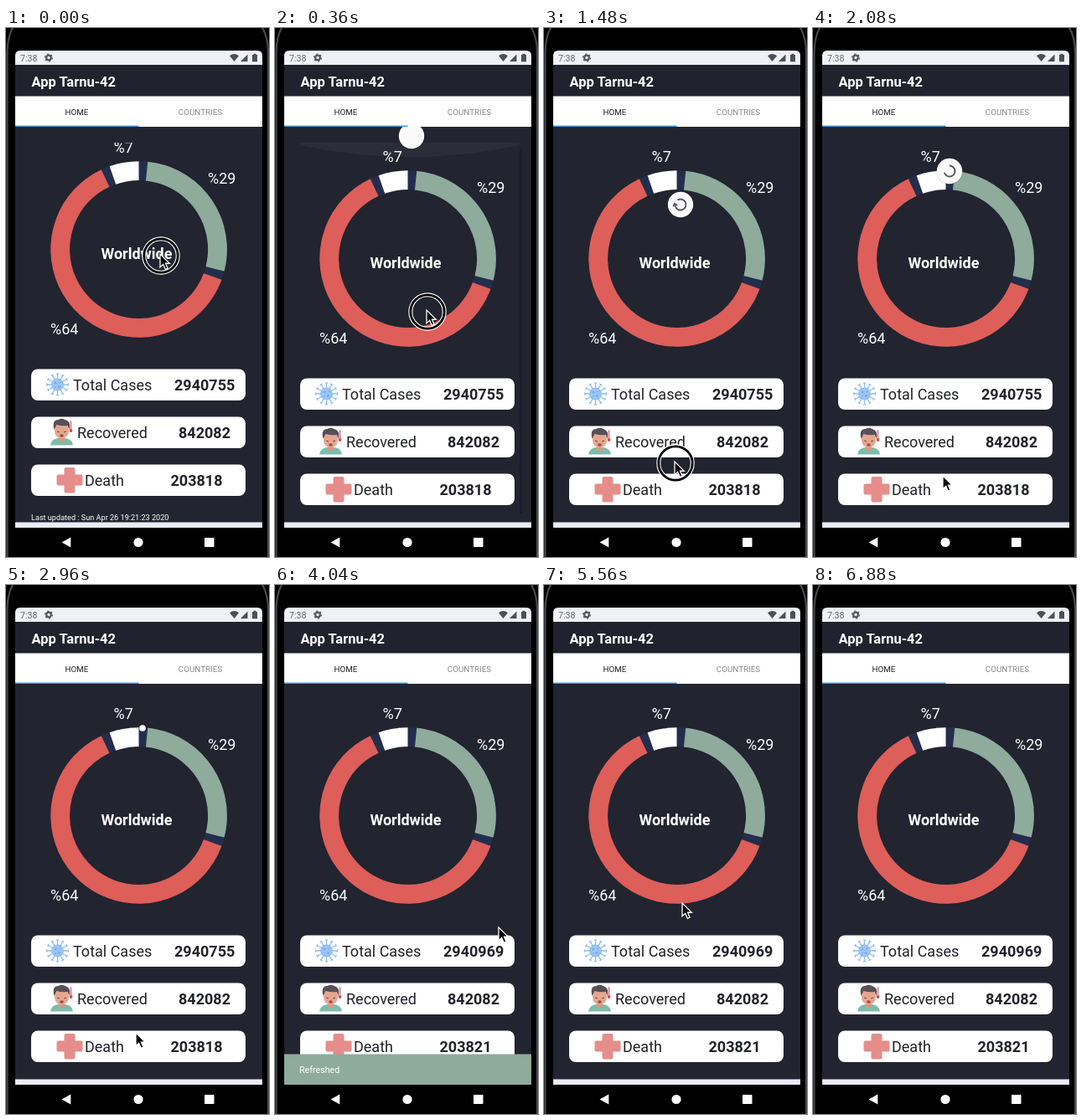
Recreate the animation shown at these times as an HTML page. Size 314 by 632 pixels, loop 6920 ms.

```html
<!DOCTYPE html>
<html lang="en">
<head>
<meta charset="utf-8">
<title>Case tracker</title>
<style>
html, body { margin: 0; width: 100%; height: 100%; overflow: hidden; background: #000; }
svg { display: block; width: 314px; height: 632px; font-family: Roboto, Arial, sans-serif; }
.big { font-size: 18px; }
.b { font-weight: 700; }
.ink { fill: #222329; }
.light { fill: #fff; }
</style>
</head>
<body>
<svg viewBox="0 0 314 632">
  <defs>
    <clipPath id="screen"><path d="M11 597V33q0-6 6-6H300q6 0 6 6V597Z"/></clipPath>
    <clipPath id="page"><rect x="11" y="118" width="295" height="472"/></clipPath>
    <clipPath id="list"><rect x="30" y="137" width="265" height="453"/></clipPath>
  </defs>

  <!-- phone body -->
  <rect width="314" height="632" fill="#000"/>
  <path d="M1.500 632V30Q1.500 10 9 -2M313 632V30Q313 10 305 -2" fill="none" stroke="#46484d" stroke-width="2.200"/>

  <g clip-path="url(#screen)">
    <rect x="11" y="27" width="295" height="570" fill="#22242f"/>
    <rect x="11" y="27" width="295" height="17" fill="#eff1f6"/>
    <text x="17" y="39.7" font-size="10.6" fill="#65686d">7:38</text>
    <g fill="none" stroke="#55585e">
      <circle cx="51" cy="35.5" r="2.8" stroke-width="2.2"/>
      <circle cx="51" cy="35.5" r="4.4" stroke-width="1.4" stroke-dasharray="2 2.6"/>
    </g>
    <g fill="#4c4f55">
      <path d="M267 33.2q5.500-4.400 11 0L272.500 40Z"/>
      <path d="M280 40h8.500v-8.500Z"/>
      <path d="M294 32h1.500v-1.200h3V32h1.500v8.300h-6Z"/>
    </g>
    <rect x="11" y="44" width="295" height="38" fill="#20222d"/>
    <text x="30.500" y="70" font-size="16.5" class="b light">App Tarnu-42</text>
    <rect x="11" y="81.500" width="295" height="36.500" fill="#fff"/>
    <text x="84.500" y="104" font-size="9.8" text-anchor="middle" fill="#222">HOME</text>
    <text x="232" y="104" font-size="9.8" text-anchor="middle" fill="#85868a">COUNTRIES</text>
    <rect x="11" y="116.500" width="147.500" height="1.500" fill="#3a9ae4"/>

    <g clip-path="url(#list)">
      <g id="content">
        <g id="donut" fill="none" stroke-width="22.800"></g>
        <text x="128.500" y="160" class="big light">%7</text>
        <text x="241" y="197" class="big light">%29</text>
        <text x="53" y="377" class="big light">%64</text>
        <text x="156" y="287" text-anchor="middle" class="big b light">Worldwide</text>
        <g id="cards"></g>
        <g id="virus" fill="#9cc6f8" stroke="#8fbdf3" stroke-width="1.300" transform="translate(61.5 437)">
          <circle r="6.800"/>
        </g>
        <g transform="translate(67 494)">
          <path d="M-14 15.500Q-13 8-5 7H4q8 1 9 8.500Z" fill="#7dbbae"/>
          <path d="M-4 4h7v6q-3.500 3-7 0Z" fill="#d9977f"/>
          <ellipse cx="-.5" cy="-2" rx="8.600" ry="9.500" fill="#e5a78d"/>
          <path d="M-9.500-3q-3-12 5-12q4-2.500 8 0q7 1 5.500 12l-2.500-5q-7 1-13-1Z" fill="#57505a"/>
          <path d="M-6-1l3 1M5-1l-3 1" stroke="#6a4a48" fill="none"/>
          <ellipse cx="-.5" cy="4" rx="2.300" ry="1.700" fill="#9c4a4c"/>
          <path d="M10.500-13v10" stroke="#e0707a" stroke-width="1.600" stroke-linecap="round"/>
          <circle cx="10.500" cy="-2" r="1.900" fill="#d94853"/>
        </g>
        <path d="M71.500 536h9q2 0 2 2v6.500h7q2 0 2 2v9q0 2-2 2h-7v7q0 2-2 2h-9q-2 0-2-2v-7h-7q-2 0-2-2v-9q0-2 2-2h7V538q0-2 2-2Z" fill="#e58d8a"/>
        <text x="30" y="599" font-size="9.15" class="light">Last updated : Sun Apr 26 19:21:23 2020</text>
      </g>
      <path id="glow" d="M30 137H292V140Q161 168 30 140Z" fill="#fff"/>
      <rect id="bar" x="292" y="143" width="3" height="437" fill="#1b1d27"/>
    </g>

    <g clip-path="url(#page)">
      <g id="puller">
        <circle cy=".8" r="15.600" fill="#000" opacity=".15"/>
        <circle r="15.200" fill="#fafafa"/>
        <g id="spin" fill="none" stroke="#55575b" stroke-width="1.900">
          <path id="arc"/>
          <path id="head" d="M3 0h7L6.500 4.500Z" fill="#55575b" stroke="none"/>
        </g>
      </g>
    </g>
    <rect x="11" y="590.500" width="295" height="6.500" fill="#ecebf8"/>
    <g id="snack">
      <rect x="11" y="560.500" width="295" height="36.500" fill="#8eab9c"/>
      <text x="29" y="583" font-size="10.7" class="light">Refreshed</text>
    </g>
  </g>

  <g class="light">
    <path d="M66.500 614.500L77.300 608.500V620.500Z"/>
    <circle cx="158" cy="614.500" r="5.600"/>
    <rect x="237" y="609" width="11.500" height="11" rx=".8"/>
  </g>

  <g id="cursor">
    <g id="ring" fill="none" transform="translate(1 2)">
      <circle r="20.200" stroke="#fff" stroke-width="5"/>
      <circle r="20.200" stroke="#000" stroke-width="2.800"/>
    </g>
    <path d="M0 0V14.500L3.400 11.400L5.800 17L8.400 15.900L6 10.400H10.500Z" transform="scale(1.080)" fill="#000" stroke="#fff" stroke-width="1.200"/>
  </g>
</svg>
<script>
const LOOP = 6920, STEP = 40;
const RELEASE = 1560, DONE = 2848, UPDATE = 3000;
const $ = id => document.getElementById(id);
const set = (el, attrs) => { for (const k in attrs) el.setAttribute(k, attrs[k]); return el; };
const add = (parent, tag, attrs, text = '') => {
  const el = set(document.createElementNS('http://www.w3.org/2000/svg', tag), attrs);
  el.textContent = text;
  return parent.appendChild(el);
};
const clamp = v => Math.max(0, Math.min(1, v));
const part = (t, from, to) => clamp((t - from) / (to - from));
const easeOut = p => 1 - (1 - p) ** 2;
const easeInOut = p => p * p * (3 - 2 * p);

// Each key is [time, value, ...]; values are interpolated linearly.
function track(keys, t) {
  let i = 0;
  while (i < keys.length - 2 && t >= keys[i + 1][0]) i++;
  const a = keys[i], b = keys[i + 1], p = part(t, a[0], b[0]);
  return a.slice(1).map((v, j) => v + (b[j + 1] - v) * p);
}

// Donut: every slice opens with a navy divider.
const ringSpec = { cx: 158.600, cy: 275.500, r: 93.900 };
add($('donut'), 'circle', { ...ringSpec, stroke: '#232d4c' });
const divider = 5.8;
let angle = 0;
for (const [percent, color] of [[29, '#8eab9c'], [64, '#de5e59'], [7, '#fff']]) {
  const slice = percent * 3.6, len = slice - divider;
  add($('donut'), 'circle', {
    ...ringSpec, stroke: color, pathLength: 360,
    'stroke-dasharray': `${len} ${360 - len}`,
    transform: `rotate(${angle + divider - 90} ${ringSpec.cx} ${ringSpec.cy})`
  });
  angle += slice;
}

// Cards
const cards = [
  ['Total Cases', 80, 201, '2940755', '2940969'],
  ['Recovered', 85, 206, '842082', '842082'],
  ['Death', 94, 196.500, '203818', '203821']
];
const counts = cards.map(([label, x, nx, before], i) => {
  const y = 418.500 + i * 57, g = $('cards');
  add(g, 'rect', { x: 30, y, width: 256, height: 37.500, rx: 8, fill: '#fff' });
  add(g, 'text', { x, y: y + 25.500, class: 'big ink' }, label);
  return add(g, 'text', { x: nx, y: y + 25.500, class: 'big b ink' }, before);
});

for (let a = 0; a < 360; a += 30) {
  const g = add($('virus'), 'g', { transform: `rotate(${a})` });
  add(g, 'path', { d: 'M0-6.500V-12.500M-1.700-12.800H1.700' });
}
for (const [cx, cy, r] of [[-2.500, -2, 1.5], [2.800, -2.500, 1.1], [1.800, 2.600, 1.6], [-2.600, 3.200, .9]])
  add($('virus'), 'circle', { cx, cy, r, fill: '#7dabe8', stroke: 'none' });

const pointer = [
  [0, 184, 270], [360, 181, 337], [1480, 156, 518], [1720, 155, 535], [3440, 155, 535],
  [4000, 267, 409], [4440, 267, 409], [5320, 165, 380], [5840, 165, 380], [6280, 150, 640], [LOOP, 150, 640]
];
const pull = [[140, 102], [360, 129], [1480, 211], [RELEASE, 213]];

function drawSpinner(t) {
  let head, sweep, tip = 1;
  if (t < RELEASE) {
    const p = part(t, 140, 1000);
    sweep = 288 * p;
    head = 165 - 300 * (1 - p) + (t - 1480) * .03;
  } else {
    const k = (t - RELEASE) / 1332, n = Math.floor(k), f = k - n;
    const grow = easeInOut(part(f, 0, .5)), shrink = easeInOut(part(f, .5, 1));
    const tail = -120 + k * 78 + 288 * (n + shrink);
    sweep = 12 + 276 * (grow - shrink);
    head = tail + sweep;
    tip = 1 - part(t, RELEASE, RELEASE + 200);
  }
  const a = -sweep * Math.PI / 180, r = 6.5;
  set($('arc'), { d: `M${r * Math.cos(a)} ${r * Math.sin(a)}A${r} ${r} 0 ${sweep > 180 ? 1 : 0} 1 ${r} 0` });
  set($('head'), { transform: `translate(${r * (1 - tip)} 0) scale(${tip})` });
  set($('spin'), { transform: `rotate(${head})`, opacity: t < RELEASE ? part(t, 360, 1100) : 1 });
}

function draw(t) {
  const [scroll] = track([[20, 11], [160, 0]], t);
  set($('content'), { transform: `translate(0 ${-scroll})` });
  set($('glow'), { opacity: track([[100, 0], [260, .045], [420, .045], [900, 0]], t)[0] });
  set($('bar'), { opacity: track([[0, 0], [40, 1], [460, 1], [720, 0]], t)[0] });

  const y = t < RELEASE ? track(pull, t)[0] : 213 - 42 * easeOut(part(t, RELEASE, RELEASE + 200));
  const size = 1 - part(t, DONE, DONE + 150);
  set($('puller'), { transform: `translate(163 ${y}) scale(${size})`, opacity: t > 140 && size > 0 ? 1 : 0 });
  drawSpinner(t);

  const late = t >= UPDATE;
  counts.forEach((el, i) => { el.textContent = cards[i][late ? 4 : 3]; });
  const shown = easeInOut(part(t, UPDATE, UPDATE + 250)) - easeInOut(part(t, 4750, 5000));
  set($('snack'), { transform: `translate(0 ${36.5 * (1 - shown)})` });

  const [cx, cy] = track(pointer, t);
  set($('cursor'), { transform: `translate(${cx} ${cy})` });
  set($('ring'), { opacity: 1 - part(t, RELEASE, RELEASE + 120) });
}

const start = performance.now();
function tick() {
  const t = (performance.now() - start) % LOOP;
  draw(Math.floor(t / STEP) * STEP);
  requestAnimationFrame(tick);
}
tick();
</script>
</body>
</html>
```
